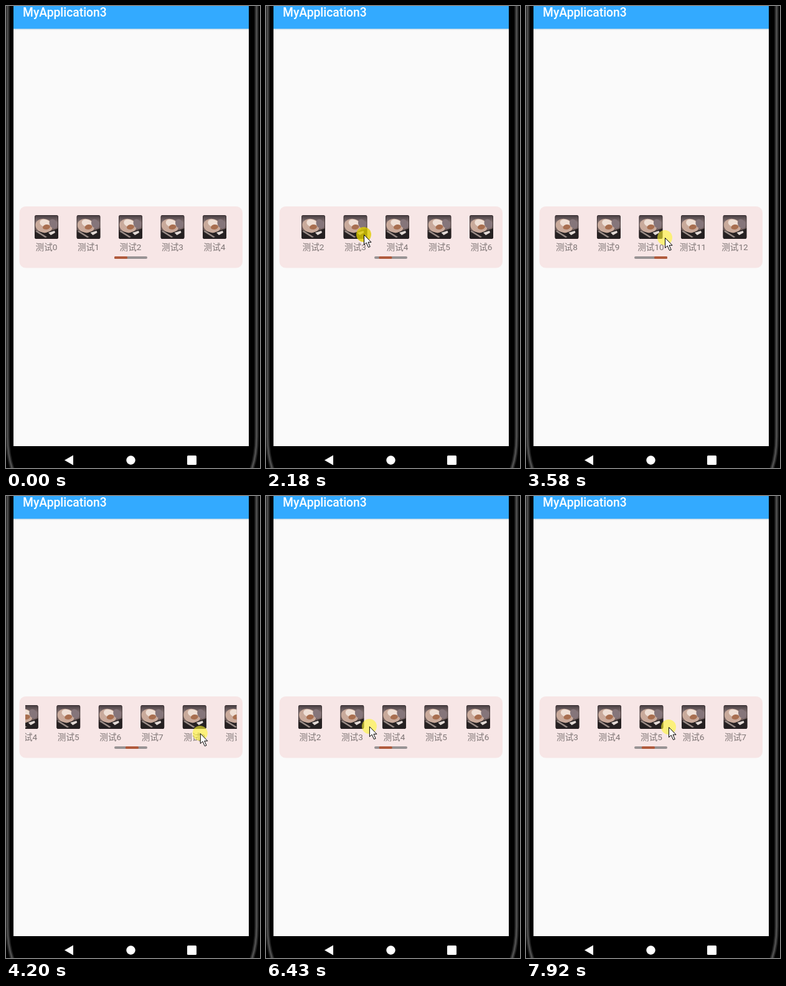
These frames come from a looping animation (408 px wide and 740 px high, 8 s). An HTML page with a canvas:

```html
<!DOCTYPE html>
<html lang="zh">
<head>
<meta charset="utf-8">
<style>
  html, body { margin: 0; width: 100%; height: 100%; overflow: hidden; background: #000; }
  canvas { display: block; }
</style>
</head>
<body>
<canvas id="stage" width="408" height="740"></canvas>
<script>
const ctx = document.getElementById('stage').getContext('2d');
const LOOP = 8000, ITEMS = 13, PITCH = 67.5, MAX_SCROLL = 540;
const ENTER = 160, TOUCH_SLOP = 8, FLING_DECAY = 130, RELEASE_FLASH = 70;

// Pointer stops: time, x, y
const STOPS = [
  [ENTER, 372, 655], [900, 239, 389], [1130, 289, 376], [2180, 157, 366],
  [2300, 157, 366], [2740, 13, 372], [3380, 223, 371], [3590, 223, 371],
  [3820, 396, 384], [4050, 231, 380], [4280, 354, 380], [4940, 303, 369],
  [5610, 303, 369], [6430, 166, 369], [7000, 109, 370], [7290, 252, 370],
  [7920, 229, 370]
];

// Drags of the list; flingTo is where it coasts after the release
const DRAGS = [
  { from: 1130, to: 2180 },
  { from: 2300, to: 2740, flingTo: MAX_SCROLL },
  { from: 3500, to: 3820 },
  { from: 4050, to: 4280, flingTo: 0 },
  { from: 5560, to: 7000 },
  { from: 7290, to: LOOP }
];

function pointerAt(t) {
  const next = STOPS.findIndex(stop => stop[0] > t);
  if (next < 1) return STOPS.at(next).slice(1);
  const [t0, x0, y0] = STOPS[next - 1], [t1, x1, y1] = STOPS[next];
  const p = (t - t0) / (t1 - t0);
  return [x0 + (x1 - x0) * p, y0 + (y1 - y0) * p];
}

function scrollAt(t) {
  let scroll = 0;
  for (const { from, to, flingTo } of DRAGS) {
    if (t < from) break;
    const dx = pointerAt(Math.min(t, to))[0] - pointerAt(from)[0];
    scroll -= Math.sign(dx) * Math.max(0, Math.abs(dx) - TOUCH_SLOP);
    if (flingTo !== undefined && t > to) {
      scroll = flingTo + (scroll - flingTo) * Math.exp((to - t) / FLING_DECAY);
    }
  }
  return Math.min(MAX_SCROLL, Math.max(0, scroll));
}

function rect(x, y, w, h, fill, r = 0) {
  ctx.fillStyle = fill;
  ctx.beginPath();
  ctx.roundRect(x, y, w, h, r);
  ctx.fill();
}

function ellipse(x, y, rx, ry, fill, angle = 0) {
  ctx.fillStyle = fill;
  ctx.beginPath();
  ctx.ellipse(x, y, rx, ry, angle, 0, 7);
  ctx.fill();
}

function polygon(points, fill, stroke) {
  ctx.beginPath();
  points.forEach(([x, y]) => ctx.lineTo(x, y));
  ctx.closePath();
  ctx.fillStyle = fill;
  ctx.fill();
  if (stroke) {
    ctx.strokeStyle = stroke;
    ctx.lineWidth = 1;
    ctx.stroke();
  }
}

function verticalGradient(y, height, colors) {
  const g = ctx.createLinearGradient(0, y, 0, y + height);
  colors.forEach((c, i) => g.addColorStop(i / (colors.length - 1), c));
  return g;
}

function text(str, x, y, font, fill, align) {
  ctx.font = font;
  ctx.fillStyle = fill;
  ctx.textAlign = align;
  ctx.fillText(str, x, y);
}

// Metal edge of the phone, bending inwards (dir) at the bottom
function drawEdge(x, dir) {
  for (const [width, color] of [[7, '#1e1e1e'], [4, '#383838'], [1.5, '#565656']]) {
    ctx.strokeStyle = color;
    ctx.lineWidth = width;
    ctx.beginPath();
    ctx.moveTo(x, 0);
    ctx.lineTo(x, 690);
    ctx.quadraticCurveTo(x, 722, x + 9 * dir, 745);
    ctx.stroke();
  }
}

function drawPhone() {
  rect(0, 0, 408, 740, '#000');
  drawEdge(2.5, 1);
  drawEdge(402.5, -1);
  rect(12, 0, 378, 705, '#fafafa');
  rect(12, 36, 378, 3, verticalGradient(36, 3, ['#cfd8de', '#fafafa']));
  rect(12, 0, 378, 36.5, '#33aaff');
  text('MyApplication3', 27, 17, '500 19.3px Roboto, sans-serif', '#fff', 'left');
  polygon([[94, 727.5], [108, 719.5], [108, 735.5]], '#fff');
  ellipse(200.5, 727.5, 7.2, 7.2, '#fff');
  rect(291, 720, 15, 15, '#fff', 1.5);
  rect(21.5, 321, 358.5, 98.5, '#f7e6e6', 10);
}

function drawPhoto(x, y) {
  ctx.save();
  ctx.translate(x, y);
  ctx.beginPath();
  ctx.roundRect(0, 0, 38, 38, 3);
  ctx.clip();
  rect(0, 0, 38, 38, verticalGradient(0, 38, ['#453c40', '#8b7878', '#6a5855', '#242021']));
  ellipse(15, 17, 14, 11, '#c9aa9b', 0.2);
  ellipse(17, 13, 9, 6, '#efdfd5', 0.3);
  ellipse(19, 19, 6, 4, '#a86f50', -0.2);
  ellipse(30, 14, 6, 8, '#85757a', -0.5);
  polygon([[0, 24], [16, 29], [38, 21], [38, 38], [0, 38]], '#262122');
  polygon([[1, 26], [4, 25], [20, 35], [17, 36]], '#9b8d88');
  polygon([[22, 28], [32, 25], [33, 28], [26, 32]], '#e3dad6');
  ctx.strokeStyle = 'rgba(40,32,34,.7)';
  ctx.lineWidth = 2;
  ctx.strokeRect(0, 0, 38, 38);
  ctx.restore();
}

function drawList(scroll) {
  ctx.save();
  ctx.beginPath();
  ctx.rect(31, 330, 339.5, 68);
  ctx.clip();
  for (let i = 0; i < ITEMS; i++) {
    const x = 65 + i * PITCH - scroll;
    drawPhoto(x - 19, 335);
    text('测试' + i, x, 391, '13.6px Roboto, "Noto Sans CJK SC", "Noto Sans CJK", sans-serif', '#7d7474', 'center');
  }
  ctx.restore();
  rect(174, 401, 53, 4, '#989394', 2);
  rect(174 + scroll / MAX_SCROLL * 32, 401, 21, 4, '#b05a3c', 1.5);
}

function drawPointer(t) {
  const [x, y] = pointerAt(t);
  const within = (from, to) => t >= from && t < to;
  if (DRAGS.some(d => within(d.to, d.to + RELEASE_FLASH))) {
    ellipse(x, y, 12, 12, 'rgba(222,205,0,.8)');
  } else if (DRAGS.some(d => within(d.from, d.to))) {
    ellipse(x, y, 12, 12, 'rgba(255,246,50,.6)');
  }
  ctx.save();
  ctx.translate(x + 0.5, y + 0.5);
  polygon([[0, 0], [0, 16], [3.7, 12.6], [7, 20], [9.7, 19], [6.5, 11.8], [11.5, 11.8]], '#fff', '#000');
  ctx.restore();
}

function draw() {
  const t = performance.now() % LOOP;
  drawPhone();
  drawList(scrollAt(t));
  if (t >= ENTER) drawPointer(t);
  requestAnimationFrame(draw);
}
draw();
</script>
</body>
</html>
```
